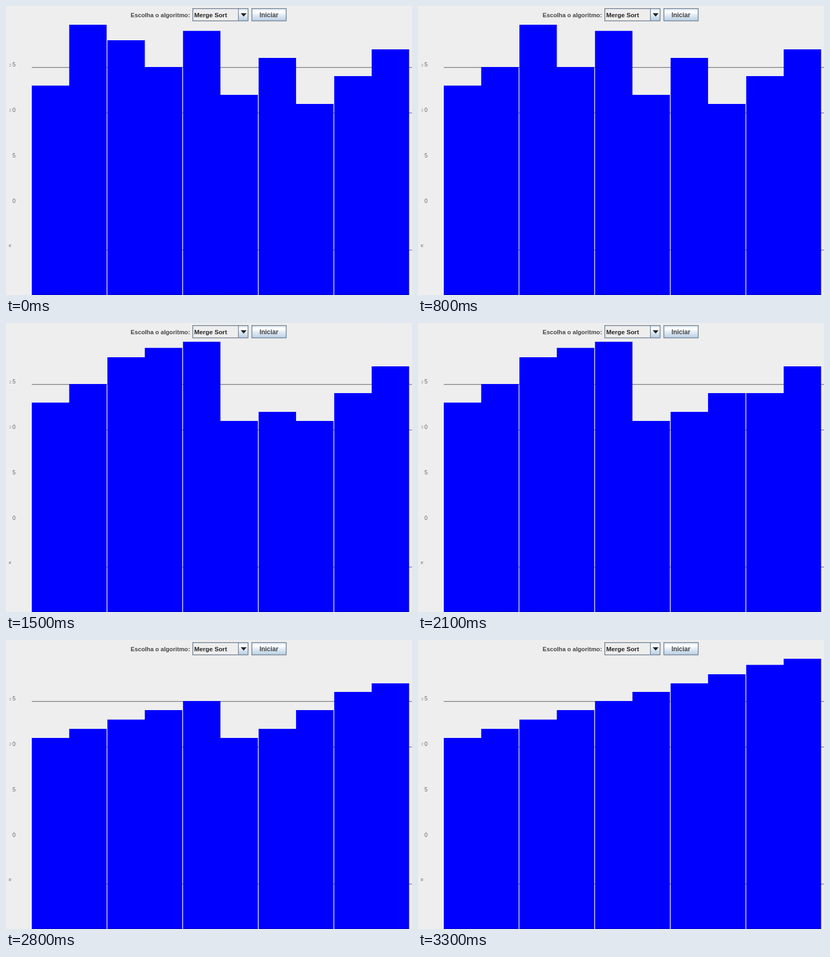
Animation, 756 px wide and 540 px high, one loop 3.4 s. Source, as an HTML page with a canvas:

```html
<!DOCTYPE html>
<html lang="pt">
<head>
<meta charset="utf-8">
<title>Merge Sort</title>
<style>
html, body { margin: 0; width: 100%; height: 100%; overflow: hidden; background: #eee; }
canvas { display: block; }
</style>
</head>
<body>
<canvas id="stage" width="756" height="540"></canvas>
<script>
const ctx = document.getElementById("stage").getContext("2d");
const W = 756, H = 540;
const STEP = 100, LOOP = 3400;
const BORDER = "#7a8a99";
const SANS = '"Liberation Sans", Arial, sans-serif';

// Top edge of each bar; a larger y is a smaller value.
const start = [148.7, 35, 64, 114, 46.5, 166, 97, 183, 131, 81];

// Merge sort that records every write, one per step.
function recordWrites(tops) {
  const a = tops.slice(), writes = [];
  function merge(lo, mid, hi) {
    const left = a.slice(lo, mid + 1), right = a.slice(mid + 1, hi + 1);
    for (let k = lo; k <= hi; k++) {
      const takeLeft = !right.length || (left.length && left[0] >= right[0]);
      a[k] = (takeLeft ? left : right).shift();
      writes.push([k, a[k]]);
    }
  }
  function sort(lo, hi) {
    if (lo >= hi) return;
    const mid = (lo + hi) >> 1;
    sort(lo, mid);
    sort(mid + 1, hi);
    merge(lo, mid, hi);
  }
  sort(0, a.length - 1);
  return writes;
}
const writes = recordWrites(start);

function topsAt(step) {
  const a = start.slice();
  for (const [i, top] of writes.slice(0, step + 1)) a[i] = top;
  return a;
}

function rect(x, y, w, h, fill) {
  ctx.fillStyle = fill;
  ctx.fillRect(x, y, w, h);
}

function text(str, x, y, size, weight, color) {
  ctx.font = `${weight} ${size}px ${SANS}`;
  ctx.fillStyle = color;
  ctx.fillText(str, x, y);
}

function frameBox(x, y, w, h) {
  ctx.strokeStyle = BORDER;
  ctx.lineWidth = 1.6;
  ctx.strokeRect(x + 0.8, y + 0.8, w - 1.6, h - 1.6);
}

function steel(x, y, w, h) {
  const g = ctx.createLinearGradient(0, y, 0, y + h);
  g.addColorStop(0, "#dde8f3");
  g.addColorStop(0.3, "#ffffff");
  g.addColorStop(0.5, "#e6eef6");
  g.addColorStop(1, "#b8cfe5");
  rect(x, y, w, h, g);
}

function drawControls() {
  text("Escolha o algoritmo:", 232, 21, 11.2, "bold", "#444");

  rect(347, 4, 104, 24, "#eee");
  steel(433, 5, 18, 22);
  frameBox(347, 4, 104.5, 24.5);
  rect(432, 5, 1.4, 23, BORDER);
  text("Merge Sort", 350.5, 20.6, 11.7, "bold", "#222");
  ctx.fillStyle = "#222";
  ctx.beginPath();
  ctx.moveTo(437, 13.5);
  ctx.lineTo(448, 13.5);
  ctx.lineTo(442.5, 19.8);
  ctx.fill();

  steel(457, 4, 65, 24);
  frameBox(457, 4, 65.5, 24.5);
  text("Iniciar", 472, 21, 11.9, "bold", "#444");
}

function drawAxis() {
  for (const y of [114, 199, 455.3]) rect(48, y, W - 48, 1.5, "#858585");
  const gray = "#666";
  text("2", 6, 113, 7, "normal", "#888");
  text("5", 12, 113, 10.5, "normal", gray);
  text("2", 6, 197, 7, "normal", "#888");
  text("0", 12, 197.5, 10.5, "normal", gray);
  text("5", 12, 283, 10.5, "normal", gray);
  text("0", 12, 368, 10.5, "normal", gray);
  ctx.save();
  ctx.beginPath();
  ctx.rect(0, 440, 40, 10);
  ctx.clip();
  text("5", 5, 453.5, 10.5, "normal", gray);
  ctx.restore();
}

function drawBars(tops) {
  tops.forEach((top, i) => {
    const x = 48 + 140.8 * (i >> 1) + (i % 2 ? 69.7 : 0);
    // The left bar of a pair runs slightly under its neighbour up to the shared height.
    rect(x, top, 69.7, H - top, "#00f");
    if (i % 2) {
      const y = Math.max(top, tops[i - 1]);
      rect(x - 1, y, 2, H - y, "#00f");
    }
    rect(x, H - 1, 69.7, 1, "rgba(0,0,0,0.3)");
  });
}

function draw(now) {
  const step = Math.floor((now % LOOP) / STEP);
  rect(0, 0, W, H, "#eee");
  drawAxis();
  drawBars(topsAt(step));
  drawControls();
}

const t0 = performance.now();
function tick() {
  draw(performance.now() - t0);
  requestAnimationFrame(tick);
}
tick();
</script>
</body>
</html>
```
